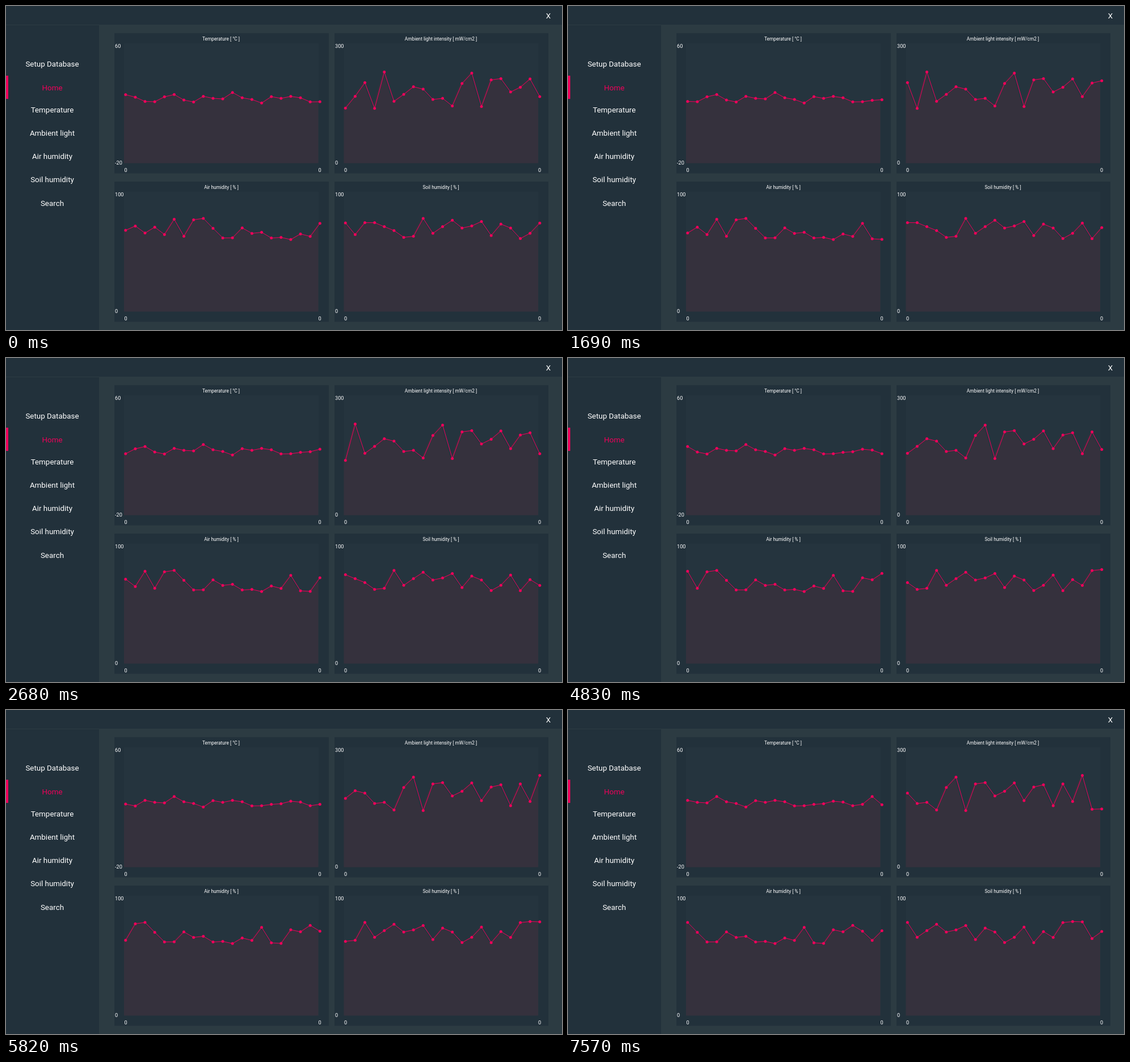
An HTML page for the animation above (8000 ms loop, 980 by 572 pixels).

```html
<!DOCTYPE html>
<html lang="en">
<head>
<meta charset="utf-8">
<title>Sensor dashboard</title>
<style>
  html, body { margin: 0; width: 100%; height: 100%; overflow: hidden; background: #2c3b42; }
  svg { display: block; width: 980px; height: 572px; }
  text { font-family: Roboto, "Open Sans", sans-serif; fill: #fff; }
  .menu { font-size: 13.4px; text-anchor: middle; }
  .title { font-size: 8.3px; text-anchor: middle; }
  .axis { font-size: 9.2px; }
  .mid { text-anchor: middle; }
  .hot { fill: #f0005a; }
  .bar, .panel { fill: #22313b; }
  .plot { fill: #25343e; }
  .area { fill: #35313d; }
  .line { fill: none; stroke: #f0005a; stroke-width: 1; }
</style>
</head>
<body>
<svg id="stage" viewBox="0 0 980 572"></svg>
<script>
const LOOP = 8000;
const STEPS = [730, 1690, 2680, 3530, 4830, 5820, 6630, 7570];
const SHOWN = 21, GAP = 17.125;

// Readings are heights on the stage; each step drops the oldest one.
const CHARTS = [
  { x: 191, y: 48, w: 378, px: 208, title: 'Temperature [ °C ]', tx: 379, top: '60', low: '-20', data: [
    156.5, 161, 168.5, 169, 160.3, 156.3, 166, 169.4, 159.4, 163, 164, 152.7, 162, 165, 171.3,
    160, 163, 159.6, 162, 169.3, 169, 166.6, 165.4, 161, 162.6, 169, 166.4, 152.8, 167.2] },
  { x: 579, y: 48, w: 377, px: 595.5, title: 'Ambient light intensity [ mW/cm2 ]', tx: 766.5, top: '300', low: '0', data: [
    180.2, 159.4, 135.3, 180.8, 116.6, 168.3, 156, 142.5, 146.8, 165, 163, 176.5, 136.8, 118.4, 177.5,
    130.4, 128.2, 151.8, 143.4, 128.8, 160, 136, 132, 169, 130.5, 161.6, 115.5, 175.2, 174.7] },
  { x: 191, y: 310, w: 378, px: 208, title: 'Air humidity [ % ]', tx: 379.5, top: '100', low: '0', data: [
    396, 388.4, 400.8, 390.4, 403.4, 376.6, 406.6, 377.4, 375, 392.5, 409.4, 409.3, 391.8, 401.4, 399.5,
    409.6, 408.5, 412.3, 402.4, 406.8, 383.8, 411, 412, 388, 391.6, 380.3, 390.6, 406.8, 389.8] },
  { x: 579, y: 310, w: 377, px: 595.5, title: 'Soil humidity [ % ]', tx: 766.5, top: '100', low: '0', data: [
    383, 403.6, 382.4, 382.5, 389.6, 396.4, 408.4, 406.6, 375, 401.3, 389.5, 378.3, 391.9, 388.3, 380.4,
    405.2, 385, 392, 410.6, 401.2, 383.3, 410.7, 391.2, 401.6, 375.3, 373.4, 374, 403.5, 391] }
];
const MENU = [['Setup Database', 106.5], ['Home', 149.2], ['Temperature', 188.4], ['Ambient light', 229.2],
  ['Air humidity', 270.2], ['Soil humidity', 311.2], ['Search', 353.4]];

const stage = document.getElementById('stage');

function add(tag, cls, attrs, label) {
  const el = document.createElementNS('http://www.w3.org/2000/svg', tag);
  el.setAttribute('class', cls);
  for (const k in attrs) el.setAttribute(k, attrs[k]);
  if (label) el.textContent = label;
  stage.appendChild(el);
  return el;
}
const rect = (cls, x, y, width, height) => add('rect', cls, { x, y, width, height });
const text = (cls, x, y, label) => add('text', cls, { x, y }, label);

rect('bar', 0, 0, 980, 33);
rect('bar', 0, 34, 164, 538);
rect('hot', 0, 123, 4, 41);
text('menu', 956, 21.8, 'X');
for (const [label, y] of MENU) text(label === 'Home' ? 'menu hot' : 'menu', 81.5, y, label);

for (const c of CHARTS) {
  c.base = c.y + 229.5;
  c.left = c.px + 2.8;
  const right = c.left + GAP * (SHOWN - 1);
  rect('panel', c.x, c.y, c.w, 247.5);
  rect('plot', c.px, c.y + 18, 343, 211.5);
  c.area = add('polygon', 'area');
  c.line = add('polyline', 'line');
  c.dots = Array.from({ length: SHOWN }, (_, i) => add('circle', 'hot', { cx: c.left + i * GAP, r: 2.5 }));
  text('title', c.tx, c.y + 13.4, c.title);
  text('axis', c.x + 1, c.y + 25.8, c.top);
  text('axis', c.x + 1, c.y + 231.8, c.low);
  text('axis mid', c.left + 0.2, c.y + 244.8, '0');
  text('axis mid', right - 0.2, c.y + 244.8, '0');
}

function show(step) {
  for (const c of CHARTS) {
    const ys = c.data.slice(step, step + SHOWN);
    const path = dx => ys.map((y, i) => `${c.left + dx + i * GAP},${y}`).join(' ');
    c.line.setAttribute('points', path(0));
    c.area.setAttribute('points', `${c.px},${c.base} ${path(-2.8)} ${c.px + GAP * (SHOWN - 1)},${c.base}`);
    c.dots.forEach((dot, i) => dot.setAttribute('cy', ys[i]));
  }
}

const start = performance.now();
let current = -1;
function tick(now) {
  const t = Math.max(0, now - start) % LOOP;
  const step = STEPS.filter(s => s <= t).length;
  if (step !== current) show(current = step);
  requestAnimationFrame(tick);
}
tick(start);
</script>
</body>
</html>
```
